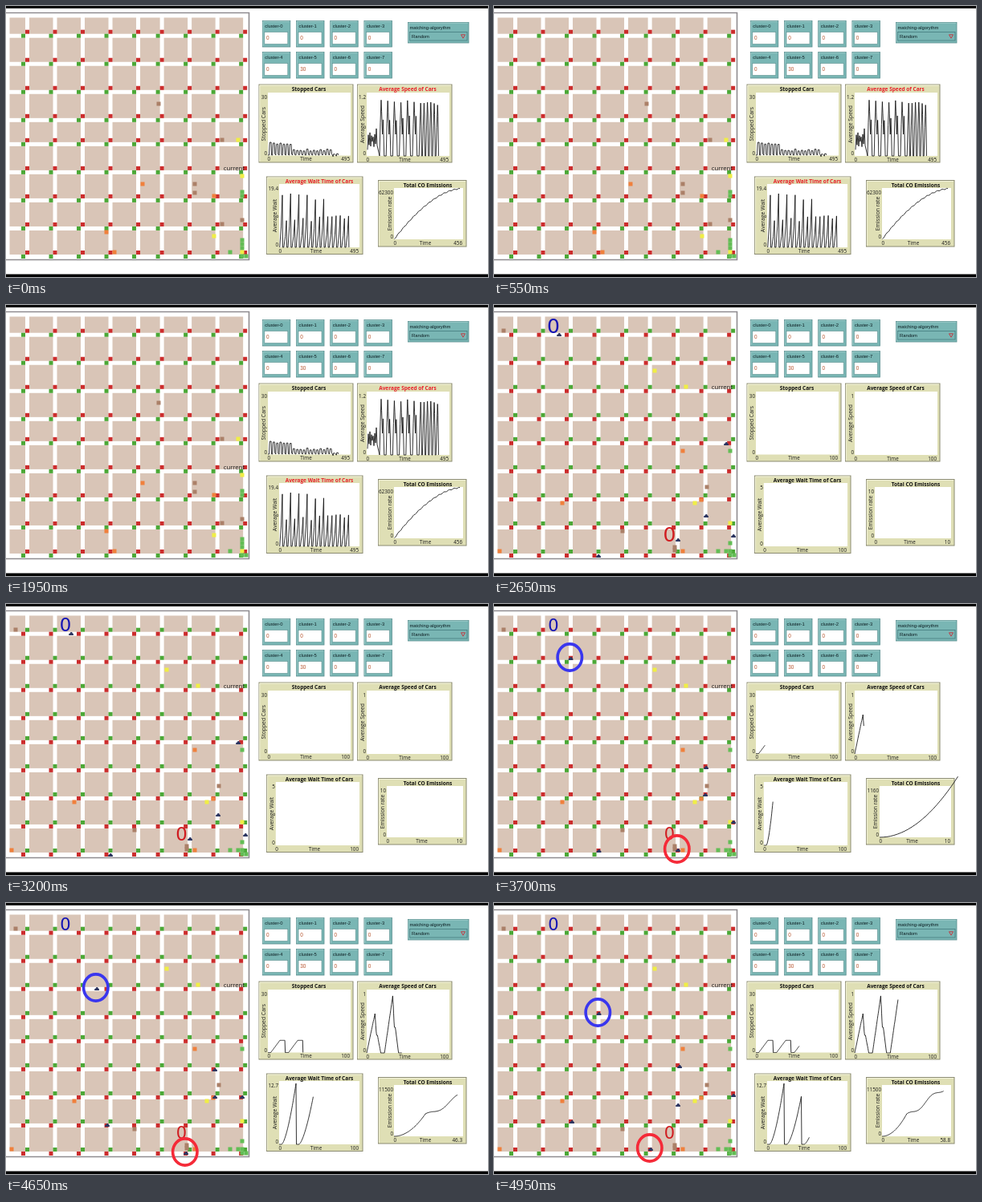
Recreate the animation shown at these times as an HTML page. Size 600 px wide and 338 px high, loop 5 s.

```html
<!DOCTYPE html>
<html lang="en">
<head>
<meta charset="utf-8">
<title>Traffic grid simulation</title>
<style>
html, body { margin: 0; width: 100%; height: 100%; overflow: hidden; background: #fff; }
svg { display: block; width: 100vw; height: 100vh; }
text { font-family: "Open Sans", "Noto Sans", sans-serif; font-size: 6.3px; fill: #1a1a1a; }
.ui { font-family: "Liberation Sans", Arial, sans-serif; font-size: 5.8px; fill: #0c1c20; }
.title { font-size: 6.5px; font-weight: 700; fill: #111; }
.axis { font-size: 6.8px; }
.zero { font-family: "DejaVu Sans", sans-serif; }
.mid { text-anchor: middle; }
.end { text-anchor: end; }
.line { fill: none; stroke: #111; stroke-width: .85; stroke-linejoin: round; }
</style>
</head>
<body>
<svg viewBox="0 0 600 338" preserveAspectRatio="none">
  <g id="base"></g>
  <g id="live"></g>
</svg>
<script>
const LOOP = 5000, RESET = 2100, START = 3370;
const RED = '#cc2c2c', GREEN = '#4ba836';
const PATCH = { b: '#ab8068', o: '#f0803c', y: '#f0ee45', g: '#62bd55' };

const range = n => [...Array(n).keys()];
const clamp = v => Math.min(1, Math.max(0, v));
const mix = (a, b, u) => a + (b - a) * u;
let seed = 7;
const rand = () => (seed = seed * 16807 % 2147483647) / 2147483647;

const rect = (x, y, w, h, fill, more = '') =>
  `<rect x="${x}" y="${y}" width="${w}" height="${h}" fill="${fill}" ${more}/>`;
const text = (x, y, s, cls = '', more = '') =>
  `<text x="${x}" y="${y}" class="${cls}" ${more}>${s}</text>`;
const line = pts =>
  `<polyline class="line" points="${pts.map(p => p.map(n => n.toFixed(1))).join(' ')}"/>`;
const cell = (x, y, fill) => rect(x - 2.5, y - 2.5, 5, 5, fill);

// --- Street grid -------------------------------------------------------
// Nine roads each way, seven patches apart; one block is a patch narrower.
const roads = (from, patch, narrow) =>
  range(9).map(i => from + patch * (7 * i - (i >= narrow ? 1 : 0)));
const roadX = roads(24, 4.93, 5), roadY = roads(34.7, 5.005, 4);

const blocks = () => roadY.map((y1, j) => roadX.map((x1, i) => {
  const x0 = i ? roadX[i - 1] + 5 : 4.5, y0 = j ? roadY[j - 1] + 5 : 14.5;
  return rect(x0, y0, x1 - x0, y1 - y0, '#d9c5b7');
}).join('')).join('');

function lights(swapped) {
  const [upper, lower] = swapped ? [GREEN, RED] : [RED, GREEN];
  return roadY.map(y => roadX.map(x =>
    cell(x + 2.5, y - 2.5, upper) + cell(x - 2.5, y + 2.5, lower)).join('')).join('');
}

// Parked cars by colour; a column is a string with one letter per patch.
const patches = groups => Object.entries(groups).map(([c, spots]) =>
  spots.map(([x, y]) => cell(x, y, PATCH[c])).join('')).join('');
const column = (x, y, letters) => [...letters].map((c, i) =>
  PATCH[c] ? cell(x, y + 5 * i, PATCH[c]) : '').join('');

const oldPatches = patches({
  b: [[190, 122], [269, 167], [235, 222], [235, 233], [269, 272]],
  o: [[170, 222], [259, 237], [125, 282], [135, 307]],
  y: [[289, 167], [259, 287]],
  g: [[279, 307], [299, 312]]
}) + column(294, 212, 'y...gg.....b....gggyg');
const newPatches = patches({
  b: [[12, 32], [265, 227], [160, 282], [225, 302], [225, 306]],
  o: [[235, 182], [258, 243], [85, 247], [235, 307], [7, 307]],
  y: [[200, 82], [239, 102], [250, 247]],
  g: [[294, 182], [279, 307], [289, 307], [299, 312]]
}) + column(294, 272, 'y....g.gg');

// --- Cars --------------------------------------------------------------
// Each car drives between its stops whenever the lights let it go,
// turning one corner per leg: across first, then down first, and so on.
const legs = [[0, 9], [25, 33], [45, 51]];
const cars = [
  [[81, 37], [95.5, 68], [113, 107], [130.5, 138]],
  [[229, 293], [229, 307], [224, 312], [195, 307]],
  [[289, 173], [264, 204], [260, 208], [231, 204]],
  [[264, 263], [263, 238], [260, 242], [229, 252]],
  [[298, 288], [298, 272], [294, 242], [298, 240]],
  [[130, 313], [130.5, 308], [126, 277], [97, 273]]];

function drive(stops, tick) {
  let pos = stops[0];
  legs.forEach(([from, to], i) => {
    if (tick <= from) return;
    const [x0, y0] = stops[i], [x1, y1] = stops[i + 1];
    const dx = Math.abs(x1 - x0), dy = Math.abs(y1 - y0);
    const way = clamp((tick - from) / (to - from)) * (dx + dy);
    const u = clamp((i % 2 ? way - dy : way) / (dx || 1));
    const v = clamp((i % 2 ? way : way - dx) / (dy || 1));
    pos = [mix(x0, x1, u), mix(y0, y1, v)];
  });
  return pos;
}

const car = ([x, y]) =>
  `<path transform="translate(${x.toFixed(1)} ${y.toFixed(1)})" fill="#2c3560" d="M-2.8 2V.2l1.4-.7 1-1.6h1.4l.9 1.6 1 .7V2z"/>`;
const ring = ([x, y], color) =>
  `<ellipse cx="${x - 1.2}" cy="${y - 1.5}" rx="15.2" ry="16.6" fill="none" stroke="${color}" stroke-width="3.6"/>`;

// --- Measured values ---------------------------------------------------
const CYCLE = 21.5;
const phase = t => t % CYCLE;

const stopped = t => phase(t) > 20.5 ? 0 : 5.8 * clamp((phase(t) - 3.5) / 11);

function speed(t) {
  const p = phase(t), top = t < CYCLE ? .62 : .9;
  const shape = p < 10 ? p / 10 : p < 12 ? mix(1, .4, (p - 10) / 2) : .45 * clamp((17 - p) / 4);
  return top * shape;
}

const wait = t =>
  (12.2 - 2.6 * Math.floor(t / CYCLE)) * Math.max(0, (phase(t) - 3) / 18) ** 1.55;

function emission(t) {
  const s = Math.max(0, t - 21);
  return 11.44 * Math.min(t, 21) ** 2 + 200 * s - 1150 * Math.sin(Math.PI * s / CYCLE) ** 2;
}

// An axis grows to 1.25 times any value that passes its end.
function grow(max, f, tick) {
  for (let i = 0; i <= tick; i++) if (f(i) > max) max = f(i) * 1.25;
  return max;
}
const short = n => String(+n.toPrecision(3));

// --- Charts ------------------------------------------------------------
const charts = [
  { x: 315, y: 98, w: 117, h: 97, l: 326, r: 429, t: 108, b: 186.5, mid: 377, name: 'Stopped Cars', axis: 'Stopped Cars' },
  { x: 437.5, y: 98, w: 117.5, h: 97, l: 449, r: 552, t: 108, b: 187, mid: 500, name: 'Average Speed of Cars', axis: 'Average Speed' },
  { x: 324.5, y: 213, w: 119.5, h: 96.5, l: 334.4, grow: 1.4, r: 440, t: 222, b: 301, mid: 390, name: 'Average Wait Time of Cars', axis: 'Average Wait' },
  { x: 463.5, y: 217.5, w: 109.5, h: 82.5, l: 468, grow: 3, r: 569, t: 227, b: 291, mid: 525, name: 'Total CO Emissions', axis: 'Emission rate' }];

// The plot's left edge makes room for the label of the top value.
const leftOf = (c, top) => c.l + (c.grow || 0) * top.length;

function chart(c, top, right, color = '#111') {
  const l = leftOf(c, top), ax = l - 2.7, am = (c.t + c.b) / 2;
  return rect(c.x, c.y, c.w, c.h, '#dfdfb5', 'stroke="#8b8b72"') +
    `<path d="M${c.x + .8} ${c.y + c.h - 1}V${c.y + 1}H${c.x + c.w - 1}" fill="none" stroke="#f4f4dc"/>` +
    rect(l, c.t, c.r - l, c.b - c.t, '#fff') +
    text(c.mid, c.y + 8.4, c.name, 'title mid', `style="fill:${color}"`) +
    text(l - 1, c.t + 8.3, top, 'end') + text(l - 1, c.b - .6, 0, 'end') +
    text(l - .5, c.b + 6.6, 0) + text((l + c.r) / 2 - 4, c.b + 6.6, 'Time', 'mid') +
    text(c.r - 1, c.b + 6.6, right, 'end') +
    text(ax, am, c.axis, 'axis mid', `transform="rotate(-90 ${ax} ${am})"`);
}

function plot(c, f, tick, top, yMax, xMax) {
  const l = leftOf(c, top), n = Math.floor(tick * 2);
  const ticks = tick > 0 ? [...range(n + 1).map(i => i / 2), tick] : [];
  return line(ticks.map(t =>
    [l + t / xMax * (c.r - l), c.b - f(t) / yMax * (c.b - c.t)]));
}

// --- Finished run ------------------------------------------------------
function oldStopped() {
  const pts = [[326, 186]];
  for (let x = 327.5; x < 412; x += 4.16) {
    const top = (x < 355 ? 170 : x < 404 ? 178 : 182) + rand() * 3;
    pts.push([x, 186], [x + .6, top + 3], [x + 1, top], [x + 2.6, top], [x + 3, 184 + rand() * 2]);
  }
  return pts;
}

// Noise first, then wide spikes with a shoulder, then narrow clean ones.
function oldSpeed() {
  const pts = range(13).map(i => [450 + i, (i % 2 ? 164 : 180) - rand() * 12]);
  for (let x = 467; x < 540; x += x < 508 ? 8.2 : 4.2) {
    const wide = x < 508, top = 116 + rand() * 8;
    pts.push([x - 2, 187], [x - 1, top + 28], [x, top], [x + .6, top + 14]);
    if (wide) pts.push([x + 1.6, 160], [x + 2.4, 146 - rand() * 10], [x + 3.2, 165], [x + 3.7, 187]);
    else pts.push([x + 1.2, 187]);
  }
  return pts;
}

// Saw teeth, tall and short in turn, settling to an even height.
const oldWait = () => range(17).flatMap(i => {
  const x = 344 + 5.15 * i;
  const y = i > 11 ? 261 + rand() * 4 : i % 2 ? 262 + rand() * 8 : 231 + rand() * 12;
  return [[x - 3.3, 301], [x - 1.5, mix(y, 301, .6)], [x, y], [x + .5, 301]];
});

const oldEmission = () => range(61).map(i =>
  [483.5 + 81.5 * i / 60, 290.5 - 62.5 * (1 - (1 - i / 60) ** 1.7) + .6 * Math.sin(i * 1.35)]);

const current = y => text(297, y, 'current', 'end', 'style="font-size:7.7px"');

const oldScene = lights(false) + oldPatches + current(205) +
  chart(charts[0], '30', 495) + line(oldStopped()) +
  chart(charts[1], '1.2', 495, '#e8202a') + line(oldSpeed()) +
  chart(charts[2], '19.4', 495, '#e8202a') + line(oldWait()) +
  chart(charts[3], '62300', 456) + line(oldEmission());

// --- New run -----------------------------------------------------------
function newScene(ms) {
  const tick = Math.max(0, (ms - START) / 30.2);
  const swapped = Math.floor((tick + 15) / 20) % 2 === 0;
  const size = mix(25, 21, clamp((ms - 3000) / (START - 3000)));
  const zero = (x, y, color) =>
    text(x, y + size * .36, 0, 'zero mid', `style="font-size:${size}px;fill:${color}"`);

  const waitMax = grow(5, wait, tick), waitTop = short(waitMax);
  const coMax = grow(10, emission, tick), coTop = short(coMax);
  const coTime = grow(10, t => t, tick);
  const spots = cars.map(stops => drive(stops, tick));
  const rings = tick > 0 ? ring(spots[0], '#3a36ee') + ring(spots[1], '#f52a38') : '';

  return lights(swapped) + newPatches + current(104.8) + spots.map(car).join('') +
    zero(74, 26, '#1414b4') + zero(218.5, 286.3, '#d01c20') + rings +
    chart(charts[0], '30', 100) + plot(charts[0], stopped, tick, '30', 30, 100) +
    chart(charts[1], '1', 100) + plot(charts[1], speed, tick, '1', 1, 100) +
    chart(charts[2], waitTop, 100) + plot(charts[2], wait, tick, waitTop, waitMax, 100) +
    chart(charts[3], coTop, short(coTime)) + plot(charts[3], emission, tick, coTop, coMax, coTime);
}

// --- Fixed parts -------------------------------------------------------
const TEAL = '#79b6b4';
const bevel = (x, y, w, h) => rect(x, y, w, h, TEAL, 'stroke="#5a8f90" stroke-width=".8"') +
  `<path d="M${x + .8} ${y + h - 1}V${y + .8}H${x + w - 1}" fill="none" stroke="#a5d0ce" stroke-width=".8"/>`;

function monitor(i) {
  const x = 319.3 + 42.2 * (i % 4), y = i < 4 ? 18.5 : 57.5;
  return bevel(x, y, 34.5, 32.5) +
    text(x + 3, y + 8.8, 'cluster-' + i, 'ui') +
    rect(x + 2.5, y + 14, 29, 15, '#fff', 'stroke="#5a8f90" stroke-width=".6"') +
    text(x + 4.8, y + 23.6, i === 5 ? 30 : 0, 'ui', 'style="fill:#b5532c;font-size:6.4px"');
}

const chooser = bevel(500.5, 20.5, 75.5, 25.5) +
  text(502.5, 29.3, 'matching-algorythm', 'ui') +
  rect(502.5, 32.5, 71.5, 10.5, TEAL, 'stroke="#3d7478" stroke-width=".7"') +
  text(505, 40, 'Random', 'ui') +
  '<path d="M566.5 35.8h5l-2.5 4.4z" fill="none" stroke="#c8323c" stroke-width=".9"/>';

document.getElementById('base').innerHTML =
  rect(0, 0, 600, 338, '#fff') + rect(0, 0, 600, 3, '#000') + rect(0, 334.5, 600, 3.5, '#000') +
  '<path d="M0 8.5H302.5V316.5H0" fill="none" stroke="#8f8c90" stroke-width="1.6"/>' +
  blocks() + range(8).map(monitor).join('') + chooser;

const live = document.getElementById('live');
let shown = '';
function draw(now) {
  const ms = now % LOOP;
  const scene = ms < RESET ? oldScene : newScene(ms);
  if (scene !== shown) live.innerHTML = shown = scene;
}

const begin = performance.now();
function loop() {
  draw(performance.now() - begin);
  requestAnimationFrame(loop);
}
loop();
</script>
</body>
</html>
```
